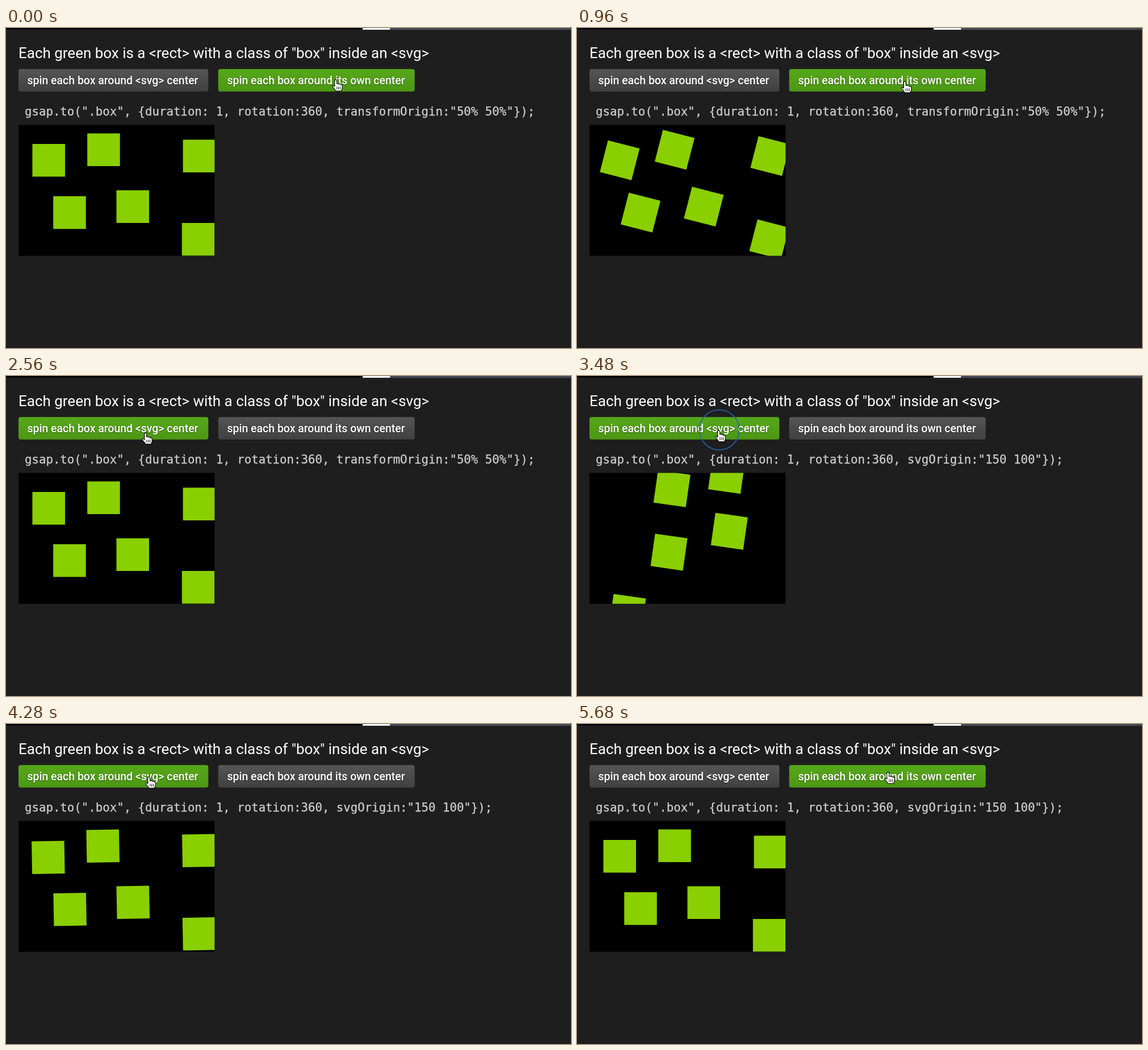
Write an HTML page that moves like this. It is 995 by 563 pixels and loops after 5760 ms.

```html
<!DOCTYPE html>
<html lang="en">
<head>
<meta charset="utf-8">
<title>Spinning boxes</title>
<style>
  html, body { margin: 0; width: 100%; height: 100%; overflow: hidden; background: #1e1e1e; }
  svg { display: block; width: 995px; height: 563px; }
  text { white-space: pre; font-family: Roboto, "Noto Sans", sans-serif; fill: #fff; }
  .title { font-size: 25.97px; }
  .label { font-size: 19.45px; font-weight: 500; filter: drop-shadow(0 1px 1px #0006); }
  .code { font: 20.73px "DejaVu Sans Mono", monospace; fill: #d0d0d0; stroke: #d0d0d0; stroke-width: .25px; }
</style>
</head>
<body>
<svg viewBox="0 0 995 563">
  <defs>
    <linearGradient id="grey" x2="0" y2="1">
      <stop stop-color="#565656"/><stop offset=".5" stop-color="#4a4a4a"/><stop offset="1" stop-color="#414141"/>
    </linearGradient>
    <linearGradient id="green" x2="0" y2="1">
      <stop stop-color="#57a81b"/><stop offset="1" stop-color="#4c9713"/>
    </linearGradient>
    <clipPath id="view"><rect x="22" y="170.5" width="345.3" height="230.2"/></clipPath>
  </defs>
  <rect width="995" height="563" fill="#1e1e1e"/>
  <path d="M0 3.5H995" stroke="#303134"/>
  <rect width="628" height="3" fill="#000"/>
  <rect x="628" width="48.5" height="3" fill="#fff"/>
  <rect x="676.5" width="318.5" height="3" fill="#434857"/>

  <text class="title" x="22" y="53">Each green box is a &lt;rect&gt; with a class of "box" inside an &lt;svg&gt;</text>
  <rect class="button" x="22" y="72.3" width="334.3" height="39.5" rx="4"/>
  <rect class="button" x="373.7" y="72.3" width="346" height="39.5" rx="4"/>
  <text class="label" x="37.5" y="99">spin each box around &lt;svg&gt; center</text>
  <text class="label" x="389.5" y="99">spin each box around its own center</text>
  <text class="code" id="code" x="33" y="154"></text>

  <rect x="22" y="170.5" width="345.3" height="230.2" fill="#000"/>
  <g id="boxes" clip-path="url(#view)" fill="#8acf00"></g>

  <circle id="ring" fill="none" stroke="#2566ad" stroke-width="1.6"/>
  <g id="hand" stroke="#000" stroke-linejoin="round" stroke-linecap="round">
    <path fill="#fff" d="M-1.7 11V1.6a1.7 1.7 0 0 1 3.4 0V6.5q2.8-1 3.2.6q2.6-.6 3 .8q2.6-.3 2.6 1.8v3.6q-.3 2.6-1.8 4.7H0q-1-2.6-4.4-5.8q-1.6-2.2 0-2.9q1.2-.4 2.7 1.7z"/>
    <path d="M2 11.5v3.6M4.6 11.5v3.6M7.2 11.5v3.6" stroke-width=".9"/>
  </g>
</svg>
<script>
const LOOP = 5760, SPIN = 1000, OWN_START = 419, SVG_START = 3334;
const SIZE = 57.5, CENTER = [194.5, 285.5];
const corners = [[46.5, 204], [143.2, 185.5], [311.6, 196.5], [83.2, 296], [194.5, 285.5], [309.8, 343]];
// Pointer tip: time, x, y
const path = [
  [0, 581, 92], [960, 577.5, 95], [1500, 577, 96], [2400, 246, 101], [2960, 246, 101],
  [3330, 250, 97], [3760, 250, 96], [4280, 252, 94], [4700, 253, 93], [5640, 548, 86], [LOOP, 548, 86]
];

const $ = id => document.getElementById(id);
const buttons = document.querySelectorAll('.button');
const clamp = v => Math.min(1, Math.max(0, v));
const easeOut = p => 1 - (1 - p) ** 2;
const easeInOut = p => p * p * (3 - 2 * p);

function setAll(node, attrs) {
  for (const [key, value] of Object.entries(attrs)) node.setAttribute(key, value);
}

const boxes = corners.map(([x, y]) => {
  const box = document.createElementNS('http://www.w3.org/2000/svg', 'rect');
  setAll(box, { x, y, width: SIZE, height: SIZE });
  return $('boxes').appendChild(box);
});

function pointer(t) {
  const i = path.findIndex(p => p[0] > t);
  const [t0, x0, y0] = path[i - 1], [t1, x1, y1] = path[i];
  const p = easeInOut((t - t0) / (t1 - t0));
  return [x0 + (x1 - x0) * p, y0 + (y1 - y0) * p];
}

function draw(t) {
  const aroundSvg = t >= SVG_START;
  const start = aroundSvg ? SVG_START : OWN_START;
  const angle = 360 * easeOut(clamp((t - start) / SPIN));
  boxes.forEach((box, i) => {
    const origin = aroundSvg ? CENTER : corners[i].map(v => v + SIZE / 2);
    box.setAttribute('transform', `rotate(${angle} ${origin})`);
  });
  $('code').textContent = 'gsap.to(".box", {duration: 1, rotation:360, ' +
    (aroundSvg ? 'svgOrigin:"150 100"});' : 'transformOrigin:"50% 50%"});');

  const [x, y] = pointer(t);
  $('hand').setAttribute('transform', `translate(${x - 0.3} ${y - 1}) scale(1.1)`);
  const hover = [x < 356.5, x > 373.7];
  buttons.forEach((b, i) => b.setAttribute('fill', `url(#${hover[i] ? 'green' : 'grey'})`));

  // Click ring grows from just before each spin begins
  const grow = [OWN_START, SVG_START].map(s => (t - s + 100) / 300).find(p => p > 0 && p < 1) ?? 0;
  setAll($('ring'), {
    cx: x + 0.5, cy: y - 2, r: 36.3 * easeOut(grow), opacity: grow && Math.min(1, (1 - grow) * 6)
  });
}

const begin = performance.now();
function tick() {
  draw((performance.now() - begin) % LOOP);
  requestAnimationFrame(tick);
}
tick();
</script>
</body>
</html>
```
